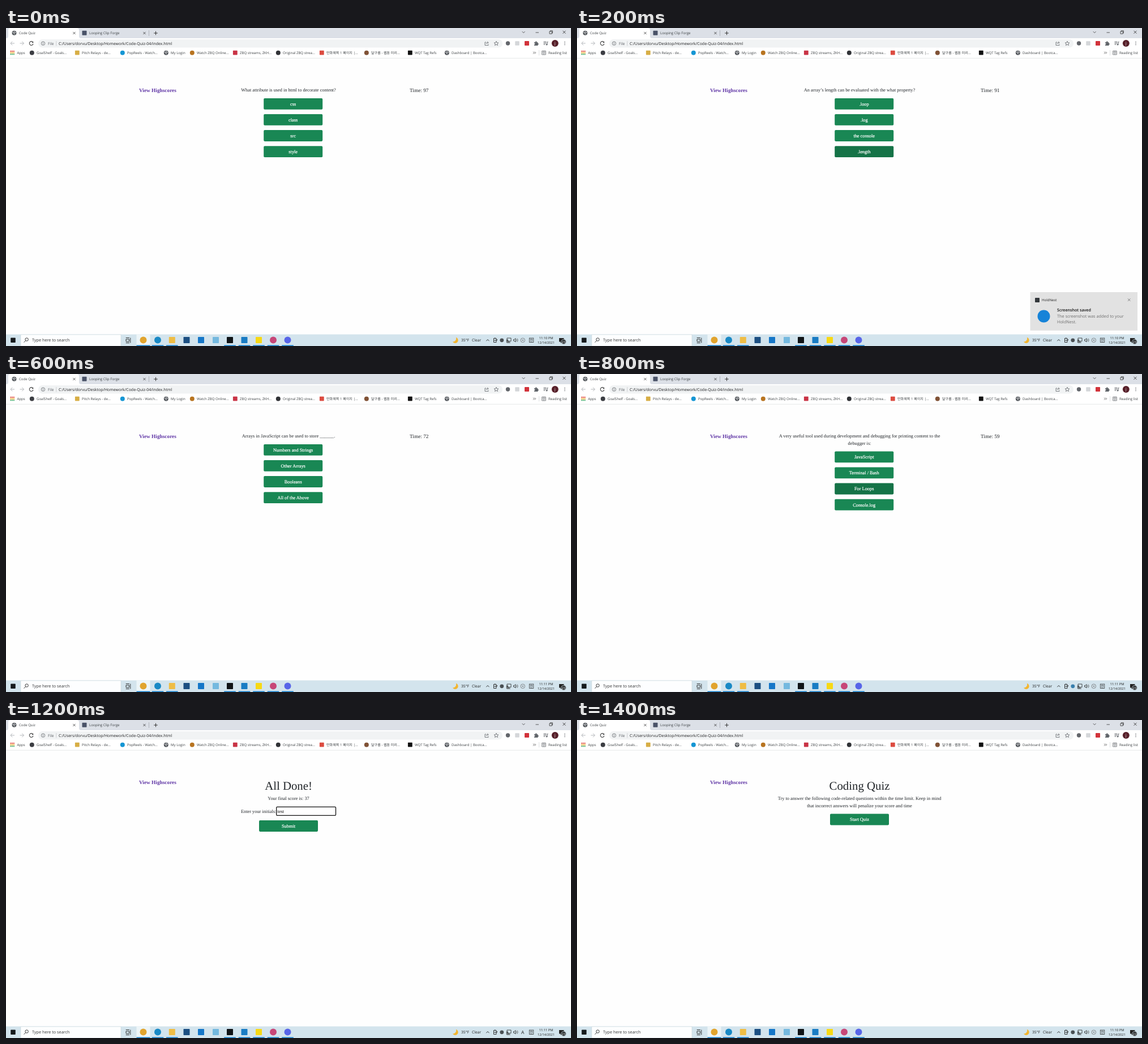
Animation, 998 px wide and 561 px high, one loop 1600 ms. Source, as an HTML page:

```html
<!DOCTYPE html>
<html lang="en">
<head>
<meta charset="utf-8">
<title>Code Quiz</title>
<style>
  html, body { margin: 0; width: 100%; height: 100%; overflow: hidden; background: #fefefe; }
  svg { display: block; width: 100vw; height: 100vh; }
  text { white-space: pre; text-rendering: geometricPrecision; }
  .ui { font-family: "Open Sans", "Noto Sans CJK KR", "Noto Sans CJK", sans-serif; }
  .page { font-family: "Liberation Serif", "Times New Roman", serif; }
</style>
</head>
<body>
<svg id="stage" viewBox="0 0 998 561" xmlns="http://www.w3.org/2000/svg"></svg>
<script>
const STEP = 200, LOOP = 1600;
const INK = '#212529', GREY = '#5f6368', GREEN = '#198754', HOVER = '#157347';
const TIMES = 8.32;

const rect = (x, y, w, h, fill, r = 0, extra = '') =>
  `<rect x="${x}" y="${y}" width="${w}" height="${h}" rx="${r}" fill="${fill}" ${extra}/>`;
const disc = (x, y, r, fill, extra = '') =>
  `<circle cx="${x}" cy="${y}" r="${r}" fill="${fill}" ${extra}/>`;
const line = (d, color = GREY, w = 0.9, fill = 'none') =>
  `<path d="${d}" stroke="${color}" stroke-width="${w}" fill="${fill}"/>`;
const label = (cls, x, y, str, size, fill, extra) =>
  `<text class="${cls}" x="${x}" y="${y}" font-size="${size}" fill="${fill}" ${extra}>${str}</text>`;
const ui = (x, y, str, size = 6.1, fill = '#3c4043', extra = '') => label('ui', x, y, str, size, fill, extra);
const page = (x, y, str, size = TIMES, fill = INK, extra = '') => label('page', x, y, str, size, fill, extra);
const MID = 'text-anchor="middle"';
const square = (x, y, s, fill) => rect(x - s / 2, y - s / 2, s, s, fill, 0.8);
const cross = (x, y, s, color = '#333', w = 0.8) =>
  line(`M${x - s} ${y - s}l${2 * s} ${2 * s}m0 ${-2 * s}l${-2 * s} ${2 * s}`, color, w);
const globe = (x, y, fill = '#55595e') => disc(x, y, 4, fill) +
  line(`M${x - 3} ${y - 1.2}q2 .2 2.4 1.4t1.6 2.2M${x + 3} ${y - 1}q-2.4 .6 -3-.4t.6-1.8`, '#f5f6f7', 1);

function tabs() {
  return rect(0, 0, 998, 24, '#dce0e7') +
    line('M1 18Q4 18 4 14V4Q4 0 8 0H125Q129 0 129 4V14Q129 18 132 18Z', 'none', 0, '#fff') +
    globe(14.5, 8.8) + ui(23, 11, 'Code Quiz', 6.06) + cross(120.5, 9, 2.1) +
    square(138.5, 8.8, 8, '#4a5268') + ui(147, 11, 'Looping Clip Forge', 6.2) + cross(244.5, 9, 2.1) +
    line('M252.5 4V14', '#9a9ea6', 0.7) + line('M261.2 9H267.8M264.5 5.7V12.3', '#333', 1) +
    line('M911.8 6.2l2.4 2.4l2.4-2.4M935.5 8H941', '#333', 0.8) +
    line('M960 6H964.2V10.2H960ZM961.3 6V4.8H965.4V9H964.2', '#333', 0.8) + cross(986, 7.3, 2.5, '#222');
}

function toolbar() {
  const arrow = (x, s, c) => line(`M${x - s * 3.5} 27H${x + s * 3.5}m${-s * 3.2} -3.3l${s * 3.2} 3.3l${-s * 3.2} 3.3`, c, 1);
  let out = rect(0, 18, 998, 35, '#fff') + rect(57, 20, 820, 14.5, '#f1f3f4', 7.2);
  out += arrow(11.5, -1, '#b4b7bb') + arrow(28, 1, '#b4b7bb') +
    line('M47.6 25.2A3.4 3.4 0 1 0 48 28', '#444', 1.1) + line('M48.3 23.4V26.2H45.5Z', 'none', 0, '#444') +
    disc(65.5, 27.2, 3.2, 'none', `stroke="${GREY}" stroke-width=".8"`) + line('M65.5 26.6V29M65.5 25.2V25.9', GREY, 0.8) +
    ui(74, 29.6, 'File', 6.7, GREY) + line('M88.8 23V31.5', '#bfc2c6', 0.7) +
    ui(93, 29.7, 'C:/Users/dorvu/Desktop/Homework/Code-Quiz-04/index.html', 6.97, '#202124');
  out += line('M848 25H846V30.5H852V28.6M848 28q.3-2.7 3.6-2.7M850.2 24l2 1.9l-2 1.9', GREY, 0.8) +
    line('M866 23.3l1.1 2.6l2.8.2l-2.1 1.8l.7 2.7l-2.5-1.5l-2.5 1.5l.7-2.7l-2.1-1.8l2.8-.2Z', GREY, 0.8);
  out += disc(886.5, 27, 3.7, '#63666b') + square(903, 27, 7.5, '#d4d6d9') + square(920, 27, 8, '#d2333b') +
    line('M933 25.2H935Q934.9 23.2 936.3 23.2T937.6 25.2H939.6V27.2Q941 27.2 941 28.2T939.6 29.3V31H933V29.2Q934.6 29 934.6 28T933 27Z', 'none', 0, GREY) +
    line('M949.5 24.5H954.5M949.5 26.8H954.5M949.5 29H952.5M956 29.3V24.6H957.6', GREY, 1) + disc(955.1, 29.3, 1.2, GREY) +
    disc(969.8, 27, 6, '#57202a') + ui(969.8, 29, 'j', 6.5, '#fff', MID);
  for (const y of [24.4, 27, 29.6]) out += disc(987, y, 0.75, GREY);
  return out;
}

function bookmarks() {
  const items = [
    [54, 'GoalShelf - Goals...', 'c', '#3b3d42'], [134, 'Pitch Relays - de...', 's', '#d7ae45'],
    [214, 'PopReels - Watch...', 'c', '#1596d4'], [291, 'My Login', 'g'],
    [337, 'Watch ZBQ Online...', 'c', '#b87420'], [413, 'ZBQ streams, ZKH...', 's', '#c93446'],
    [489, 'Original ZBQ strea...', 'c', '#303236'], [566, '만화제목 1 페이지 |...', 's', '#dc4b40'],
    [645, '달구름 - 웹툰 미리...', 'c', '#805236'], [722, 'WQT Tag Refs', 's', '#111'],
    [787, 'Dashboard | Bootca...', 'g']
  ];
  let out = '';
  const dots = ['#df4438', '#e6a31c', '#35a257'];
  for (let i = 0; i < 9; i++) out += rect(7.5 + i % 3 * 2.7, 40 + Math.floor(i / 3) * 2.7, 1.9, 1.9, dots[Math.floor(i / 3)]);
  out += ui(19.5, 45.9, 'Apps');
  for (const [x, str, kind, color] of items) {
    const cx = x - 8.2;
    out += kind === 'g' ? globe(cx, 43.7) : kind === 'c' ? disc(cx, 43.7, 4, color) : square(cx, 43.7, 7.8, color);
    out += ui(x, 45.9, str);
  }
  return out + line('M931.2 41.8l1.8 1.9l-1.8 1.9M933.8 41.8l1.8 1.9l-1.8 1.9', '#444', 0.8) +
    line('M941.5 39V48.5', '#d2d4d7', 0.7) + line('M946.7 40.5H953.3V47H946.7ZM950 40.5V47M947.8 42.4H949M947.8 44.2H949M951 42.4H952.3M951 44.2H952.3', GREY, 0.8) +
    ui(958, 45.9, 'Reading list', 6.16) + line('M0 53.3H998', '#dcdee1', 0.7);
}

function taskbar() {
  let out = rect(0, 540.5, 998, 20.5, '#d3e4ed') + square(12.5, 550.8, 8.5, '#15191c') +
    rect(26, 541, 177, 20, '#fdfeff', 0, 'stroke="#c3ced4" stroke-width=".5"') +
    disc(36.6, 549.5, 2.7, 'none', 'stroke="#222" stroke-width=".9"') + line('M34.7 551.5L31.6 554.7', '#222', 0.9) +
    ui(46, 553.4, 'Type here to search', 7.28, '#333') +
    line('M212 549H217.6V553H212ZM212 547V546.5H217.6V547M212 555V555.5H217.6V555M219.8 546.5V555.5', '#222', 0.9) +
    rect(230.5, 540.5, 24, 20.5, '#edf5f8');
  const apps = [
    [242.5, 'c', '#e1a42e', 1], [268, 'c', '#1989c5', 1], [293.3, 's', '#efbd45', 1], [319, 's', '#1c4f82', 0],
    [344.5, 's', '#1677c8', 0], [370.5, 's', '#74b9df', 0], [395.5, 's', '#101417', 1], [421, 's', '#197cc4', 1],
    [446.5, 's', '#f7d915', 1], [472, 'c', '#c74778', 1], [497.5, 'c', '#5865e8', 1]
  ];
  for (const [x, kind, color, open] of apps) {
    out += kind === 'c' ? disc(x, 550.5, 6, color) : square(x, 550.5, 11, color);
    if (open) out += rect(x - (x < 250 ? 12 : 10.3), 559.5, x < 250 ? 24 : 20.6, 1.5, '#1681cf');
  }
  out += line('M795 545.8A5.2 5.2 0 1 1 789 553.5A6 6 0 0 0 795 545.8Z', 'none', 0, '#f3b52f') +
    ui(804, 553.4, '35°F', 6.7, '#222') + ui(823, 553.4, 'Clear', 6.7, '#222');
  out += line('M848.3 552.2l2.6-2.7l2.6 2.7', '#222', 0.9) +
    line('M861.5 547.5H866V554.5H861.5ZM863.7 546.3V547.5M862.3 551H867.3V549', '#222', 0.9) +
    line('M885 547H892V552.5H885ZM888.5 552.5V555M886 555H891M884.4 550H886.5V555H884.4Z', '#222', 0.8) +
    line('M896.5 549.5H898L900 547.5V554L898 552H896.5Z', '#222', 0.8) + line('M901.5 549q1.4 1.7 0 3.5M903 547.7q2.5 3 0 6', '#444', 0.7) +
    rect(924.3, 547, 7.5, 7.5, 'none', 0, 'stroke="#222" stroke-width=".7"') + ui(928, 553.1, '한', 6, '#222', MID) +
    rect(977, 547, 8.5, 6.5, '#222') + line('M979 553L980 556L982.5 553Z', 'none', 0, '#222') +
    disc(985, 553.5, 4.3, '#2b3033', 'stroke="#d3e4ed" stroke-width=".7"');
  return out;
}

function tray(s) {
  const ime = s.latin
    ? ui(912.7, 553.8, 'A', 8.4, '#222', MID)
    : disc(912.8, 550.8, 3.8, 'none', 'stroke="#666" stroke-width=".7"') + cross(912.8, 550.8, 1.6, '#666', 0.7);
  return disc(875.8, 550.8, 3.4, s.sync ? '#397fad' : '#4a5054') + ime +
    ui(954, 548.5, s.clock, 5.8, '#222', MID) + ui(954, 557.3, '12/14/2021', 5.65, '#222', MID) +
    ui(985, 555.6, s.badge || 23, 5.5, '#fff', MID);
}

const button = (cx, y, str, fill = GREEN) =>
  rect(cx - 52, y, 104, 19.8, fill, 1.8) +
  page(cx, y + 12.8, str, TIMES, '#fff', MID + ' stroke="#fff" stroke-width=".2"');
const lines = (y, list) => list.map((str, i) => page(499, y + i * 12.5, str, TIMES, INK, MID)).join('');

function quiz(s) {
  const top = 123.9 + (s.ask.length - 1) * 12.5;
  return lines(112.3, s.ask) + page(713, 113.3, 'Time: ' + s.left, 9.3) +
    s.picks.map((str, i) => button(507.2, top + i * 28.1, str, i === s.hover ? HOVER : GREEN)).join('');
}

const heading = str => page(499, 122.7, str, 20.8, INK, MID);

function done(s) {
  return heading('All Done!') + lines(141.4, ['Your final score is: 37']) +
    page(415, 163.8, 'Enter your initials:') +
    rect(477.7, 153.4, 104.8, 15, '#fff', 1.3, 'stroke="#111" stroke-width="1.3"') +
    page(479.6, 163.8, 'test', TIMES, '#111') + (s.caret ? line('M492.3 156.5V165', '#111', 0.7) : '') +
    button(499, 177.1, 'Submit');
}

function intro() {
  return heading('Coding Quiz') + lines(141.4, [
    'Try to answer the following code-related questions within the time limit. Keep in mind',
    'that incorrect answers will penalize your score and time'
  ]) + button(499, 165.6, 'Start Quiz');
}

function toast() {
  return rect(800.5, 466, 189.5, 67.7, '#e2e2e2') + square(813, 480, 8, '#34383c') +
    ui(821, 482.1, 'HoldNest', 6.1, '#222') + cross(975.2, 479.6, 2.2, '#555', 0.7) +
    disc(824.5, 508.5, 11, '#1683d8') +
    ui(848, 499.9, 'Screenshot saved', 7.1, '#111', 'font-weight="600"') +
    ui(848, 510.5, 'The screenshot was added to your', 7.37, '#707070') + ui(848, 521, 'HoldNest.', 7.37, '#707070');
}

const arrays = {
  view: quiz, clock: '11:11 PM', left: 86, ask: ['Arrays in JavaScript can be used to store ______.'],
  picks: ['Numbers and Strings', 'Other Arrays', 'Booleans', 'All of the Above']
};
const finish = { view: done, clock: '11:11 PM', latin: true, caret: true };
const scenes = [
  { view: quiz, clock: '11:10 PM', left: 97, ask: ['What attribute is used in html to decorate content?'],
    picks: ['css', 'class', 'src', 'style'] },
  { view: quiz, clock: '11:10 PM', left: 91, ask: ['An array’s length can be evaluated with the what property?'],
    picks: ['.loop', '.log', 'the console', '.length'], hover: 3, toast: true },
  arrays,
  { ...arrays, left: 72 },
  { view: quiz, clock: '11:11 PM', left: 59, sync: true, hover: 2,
    ask: ['A very useful tool used during development and debugging for printing content to the', 'debugger is:'],
    picks: ['JavaScript', 'Terminal / Bash', 'For Loops', 'Console.log'] },
  finish,
  { ...finish, caret: false },
  { view: intro, clock: '11:10 PM', badge: 22 }
];

const stage = document.getElementById('stage');
stage.innerHTML = rect(0, 0, 998, 561, '#fefefe') + tabs() + toolbar() + bookmarks() + taskbar() +
  page(235, 113.3, 'View Highscores', 9.3, '#5f35a5', 'font-weight="700"') + '<g id="live"></g>';
const live = document.getElementById('live');

let shown = -1;
function draw(ms) {
  const i = Math.floor(ms % LOOP / STEP);
  if (i === shown) return;
  shown = i;
  const s = scenes[i];
  live.innerHTML = s.view(s) + tray(s) + (s.toast ? toast() : '');
}

const start = performance.now();
function tick() {
  draw(performance.now() - start);
  requestAnimationFrame(tick);
}
tick();
</script>
</body>
</html>
```
